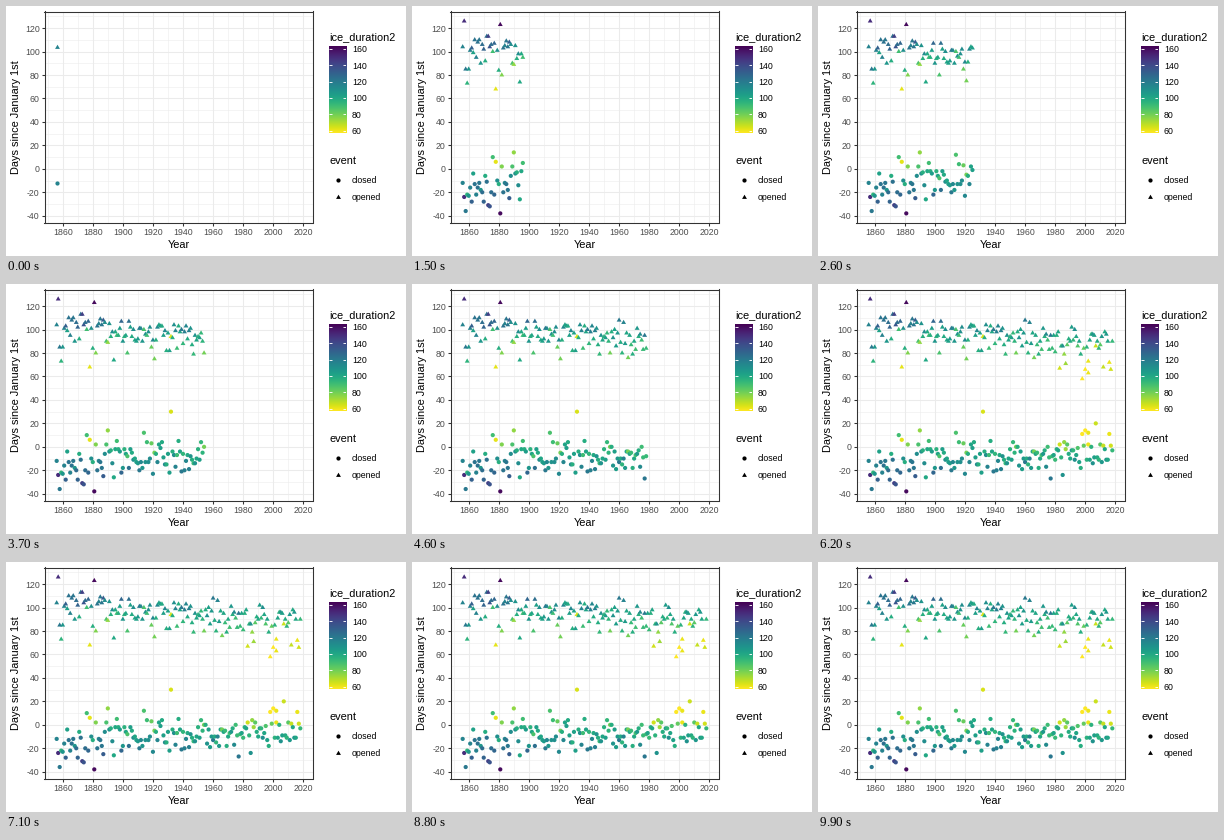
Animation of 400 by 250 pixels, one loop 10 s. Source, as a matplotlib script:

```python
import matplotlib.pyplot as plt
import numpy as np
from matplotlib.animation import FuncAnimation
from matplotlib.ticker import MultipleLocator

W, H = 400, 250
FRAMES, REVEAL = 100, 61
FIRST, LAST = 1856, 2018
PX = 0.72  # points per pixel at 100 dpi
DARK, GRID = "#333333", "#ebebeb"

plt.rcParams["font.family"] = "Liberation Sans"

# Early winters, one value per year from FIRST
EARLY_OPEN = [104, 126, 85, 73, 85, 101, 103, 99, 110, 95, 108, 110, 90, 106,
              102, 92, 113, 113, 104, 106, 100, 107, 68, 101, 84, 123, 80, 103,
              105, 109, 104, 108, 106, 90, 89, 105, 94, 98, 74, 98, 95]
EARLY_CLOSE = [-12, -24, -36, -22, -23, -16, -28, -4, -13, -22, -16, -12, -18,
               -20, -28, -6, -11, -31, -32, -20, 10, -22, 6, -10, -13, -38, 2,
               -20, -12, -13, -18, -25, -6, 2, 14, -4, -3, -14, -26, -2, 5]

# Remarkable later winters: year, opened, closed
SPECIAL = [(1899, 107, -22), (1904, 107, -18), (1914, 100, 12), (1919, 85, 3),
           (1921, 75, -5), (1932, 94, 30), (1937, 103, 5), (1966, 76, -4),
           (1977, 95, -27), (1983, 67, 2), (1987, 71, -2), (1998, 58, 11),
           (1999, 84, 1), (2000, 66, 14), (2002, 63, 2), (2002, 73, 12),
           (2007, 86, 20), (2012, 68, 1), (2016, 72, 11), (2017, 66, 1),
           (2018, 90, -3)]


def winters():
    rng = np.random.default_rng(12)
    rows = [(FIRST + i, o, c)
            for i, (o, c) in enumerate(zip(EARLY_OPEN, EARLY_CLOSE))]
    known = {row[0] for row in SPECIAL}
    for year in range(FIRST + len(rows), LAST):
        t = (year - 1897) / (LAST - 1897)
        opened = np.clip(rng.normal(95 - 4 * t, 8), 79, 108)
        closed = np.clip(rng.normal(-9, 7), -24, 4)
        if year not in known:
            rows.append((year, round(opened), round(closed)))
    return np.array(sorted(rows + SPECIAL), float)


DATA = winters()
DURATION = DATA[:, 1] - DATA[:, 2]

fig = plt.figure(figsize=(W / 100, H / 100), dpi=100, facecolor="white")


def add_panel(x0, y0, x1, y1):
    return fig.add_axes([x0 / W, 1 - y1 / H, (x1 - x0) / W, (y1 - y0) / H])


def label(x, y, text, size=8.8, **kw):
    fig.text(x / W, 1 - y / H, text, fontsize=size * PX, color="black", **kw)


# Main panel, 5 % padding around the data
ax = add_panel(38.5, 5.5, 306.5, 217)
ax.set_xlim(FIRST - 8.1, LAST + 8.1)
ax.set_ylim(-38 - 8.2, 126 + 8.2)
for axis in (ax.xaxis, ax.yaxis):
    axis.set_major_locator(MultipleLocator(20))
    axis.set_minor_locator(MultipleLocator(10))
ax.set_axisbelow(True)
ax.grid(which="major", color=GRID, lw=1.07 * PX)
ax.grid(which="minor", color=GRID, lw=0.53 * PX)
ax.tick_params(which="major", length=2.75 * PX, width=1.07 * PX, color=DARK,
               pad=2.2 * PX, labelsize=8.8 * PX, labelcolor="#4d4d4d")
ax.tick_params(which="minor", length=0)
ax.yaxis.set_major_formatter(lambda v, _: f"{v:.0f}")
ax.xaxis.set_major_formatter(lambda v, _: f"{v:.0f}")
for spine in ax.spines.values():
    spine.set(color=DARK, linewidth=1.07 * PX)
label(172.5, 242, "Year", 11, ha="center")
label(10, 111, "Days since January 1st", 11, rotation=90, ha="center",
      va="center")

# Markers
TRIANGLE = [(0, 1), (-0.866, -0.5), (0.866, -0.5), (0, 1)]
SHAPES = {"closed": ("o", (4.2 * PX) ** 2), "opened": (TRIANGLE, (5.6 * PX) ** 2)}


def points(axes, event, **kw):
    marker, size = SHAPES[event]
    return axes.scatter([], [], s=size, marker=marker, linewidths=0, zorder=3,
                        **kw)


scale = dict(cmap="viridis_r", vmin=57.5, vmax=163.5)
opened = points(ax, "opened", c=[], **scale)
closed = points(ax, "closed", c=[], **scale)

# Colour bar
bar = add_panel(323, 40.3, 340.3, 126.7)
bar.imshow(np.linspace(163.5, 57.5, 256)[:, None], aspect="auto",
           extent=(0, 1, 57.5, 163.5), **scale)
bar.axis("off")
label(323, 34, "ice_duration2", 11)
for value in range(60, 161, 20):
    bar.hlines([value] * 2, [0, 0.8], [0.2, 1], color="white", lw=0.9 * PX)
    label(346, 126.7 - (value - 57.5) / 106 * 86.4 + 3.2, str(value))

# Shape legend
keys = add_panel(323, 165, 340.3, 199.6)
keys.set(xlim=(0, 17.3), ylim=(34.6, 0))
keys.axis("off")
label(323, 158, "event", 11)
for row, event in enumerate(SHAPES):
    y = 8.65 + 17.3 * row
    points(keys, event, color="black").set_offsets([(8.65, y)])
    label(346, 165 + y + 3.2, event)


def draw(frame):
    year = FIRST + round(min(frame / REVEAL, 1) * (LAST - FIRST))
    shown = DATA[:, 0] <= year
    for dots, column in ((opened, 1), (closed, 2)):
        dots.set_offsets(DATA[shown][:, [0, column]])
        dots.set_array(DURATION[shown])
    return opened, closed


anim = FuncAnimation(fig, draw, frames=FRAMES, interval=100, repeat=True,
                     repeat_delay=0)
plt.show()
```
